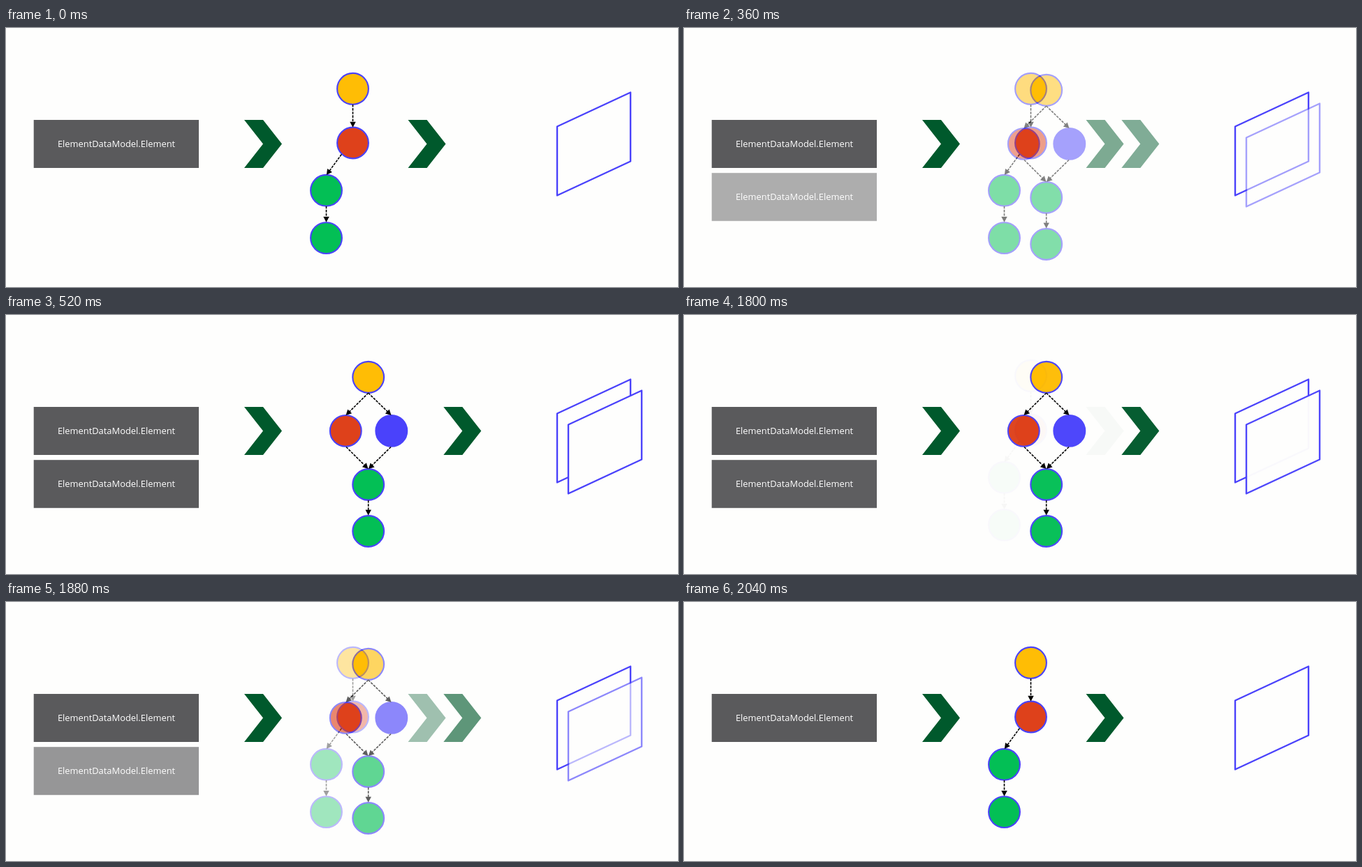
Recreate the animation shown at these times as an HTML page. Size 962 px wide and 372 px high, loop 2120 ms.

```html
<!DOCTYPE html>
<html lang="en">
<head>
<meta charset="utf-8">
<title>Element graph</title>
<style>
  html, body { margin: 0; width: 100%; height: 100%; overflow: hidden; background: #fefefd; }
  svg { display: block; width: 962px; height: 372px; }
  text { font: 12.9px "Open Sans", "Noto Sans", sans-serif; fill: #fff; text-anchor: middle; }
</style>
</head>
<body>
<svg viewBox="0 0 962 372">
  <g id="one"></g>
  <g id="two"></g>
</svg>
<script>
const PAPER = '#fefefd', GRAY = '#5a5a5c', PINE = '#00592c', BLUE = '#4a42fb';
const GOLD = '#ffbd05', RED = '#de411b', GREEN = '#03bf55';
const LOOP = 2120, STEP = 40;

const box = y =>
  `<rect x="39.7" y="${y}" width="236.3" height="69" fill="${GRAY}"/>` +
  `<text x="158" y="${y + 39.2}">ElementDataModel.Element</text>`;

const chevron = x =>
  `<path transform="translate(${x} 132)" d="M0 0H27L54 34.5L27 69H0L27 34.5Z" fill="${PINE}"/>`;

const node = (x, y, fill) =>
  `<circle cx="${x}" cy="${y}" r="22.4" fill="${fill}" stroke="${BLUE}" stroke-width="2.1"/>`;

const plane = d =>
  `<path transform="translate(${d} ${d})" d="M789 141.5L894 92.5V191.5L789 240.5Z" ` +
  `fill="${PAPER}" stroke="${BLUE}" stroke-width="2.4" stroke-linejoin="round"/>`;

// Dashed arrow drawn along its own x axis, then turned into place.
function arrow(x1, y1, x2, y2) {
  const len = Math.hypot(x2 - x1, y2 - y1);
  const turn = Math.atan2(y2 - y1, x2 - x1) * 180 / Math.PI;
  return `<g transform="translate(${x1} ${y1}) rotate(${turn})">` +
    `<path d="M0 0H${len - 7}" stroke="#000" stroke-width="1.6" stroke-dasharray="3.6 1.5"/>` +
    `<path d="M${len} 0l-8 -4.2v8.4z"/></g>`;
}

const scene = parts =>
  `<rect width="962" height="372" fill="${PAPER}"/>` + box(132) + chevron(341) + parts.join('');

const one = document.getElementById('one');
const two = document.getElementById('two');

one.innerHTML = scene([
  chevron(575.5),
  node(496.5, 87.3, GOLD), node(496.5, 165, RED),
  node(458.5, 233.3, GREEN), node(458.5, 301.6, GREEN),
  arrow(496.5, 110, 496.5, 142.8),
  arrow(480.3, 181.5, 458.8, 211),
  arrow(458.5, 256, 458.5, 279),
  plane(0)
]);

two.innerHTML = scene([
  box(208.2), chevron(626.3),
  node(518.7, 89.3, GOLD), node(486.3, 166.4, RED), node(551.8, 166.4, BLUE),
  node(518.7, 243.5, GREEN), node(518.7, 310.5, GREEN),
  arrow(518.7, 112, 486.5, 144),
  arrow(518.7, 112, 551.5, 144),
  arrow(487, 189.5, 518.5, 221),
  arrow(551, 189.5, 518.9, 221),
  arrow(518.7, 266.2, 518.7, 287.8),
  plane(0), plane(16)
]);

const clamp = v => Math.max(0, Math.min(1, v));

// cubic-bezier(0, 0, .58, 1), solved by bisection
function easeOut(x) {
  let lo = 0, hi = 1;
  for (let i = 0; i < 24; i++) {
    const s = (lo + hi) / 2;
    if (1.74 * s * s * (1 - s) + s * s * s < x) lo = s; else hi = s;
  }
  return 3 * lo * lo - 2 * lo * lo * lo;
}

function mix(t) {
  if (t < 320) return 0;
  if (t < 520) return easeOut((t - 280) / 240);
  return 1 - clamp((t - 1794) / 230);
}

function draw(ms) {
  const t = Math.floor((ms % LOOP) / STEP) * STEP;
  two.setAttribute('opacity', mix(t).toFixed(4));
}

let start = null;
function tick(now) {
  if (start === null) start = now;
  draw(Math.max(0, now - start));
  requestAnimationFrame(tick);
}
draw(0);
requestAnimationFrame(tick);
</script>
</body>
</html>
```
